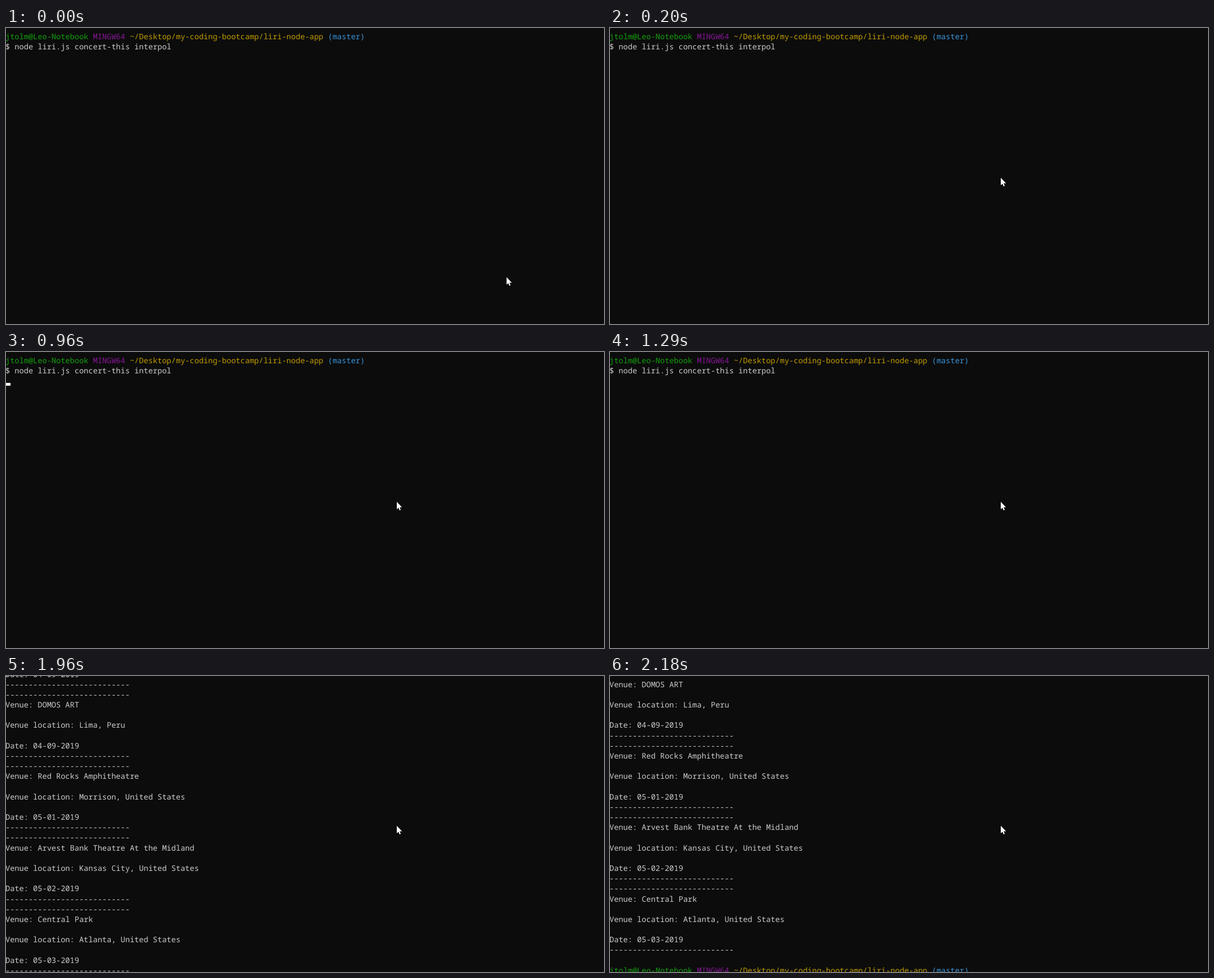
Recreate the animation shown at these times as an HTML page with a canvas. Size 1062 by 527 pixels, loop 3.06 s.

```html
<!DOCTYPE html>
<html lang="en">
<head>
<meta charset="utf-8">
<title>Terminal</title>
<style>
  html, body { margin: 0; width: 100%; height: 100%; overflow: hidden; background: #0c0c0c; }
  canvas { display: block; }
</style>
</head>
<body>
<canvas width="1062" height="527"></canvas>
<script>
const ctx = document.querySelector('canvas').getContext('2d');
const LOOP = 3060, CELL_W = 90 / 11, CELL_H = 200 / 11;
const LEFT = -1, BASE = 19.7;
const GREY = '#cccccc';

const prompt = [
  ['jtolm@Leo-Notebook ', '#13a10e'],
  ['MINGW64 ', '#881798'],
  ['~/Desktop/my-coding-bootcamp/liri-node-app ', '#c19c00'],
  ['(master)', '#3a96dd']
];
const command = '$ node liri.js concert-this interpol';
const rule = '-'.repeat(27);
const concerts = [
  ['DOMOS ART', 'Lima, Peru', '04-09-2019'],
  ['Red Rocks Amphitheatre', 'Morrison, United States', '05-01-2019'],
  ['Arvest Bank Theatre At the Midland', 'Kansas City, United States', '05-02-2019'],
  ['Central Park', 'Atlanta, United States', '05-03-2019']
];
const output = [
  'Date: 04-09-2019', rule,
  ...concerts.flatMap(([venue, place, date]) => [
    rule, 'Venue: ' + venue, '', 'Venue location: ' + place, '', 'Date: ' + date, rule
  ]),
  '', prompt
];

// A line is plain text or a list of [text, colour] runs.
function drawLine(line, row) {
  const runs = typeof line === 'string' ? [[line, GREY]] : line;
  let col = 0;
  for (const [text, color] of runs) {
    ctx.fillStyle = color;
    for (const ch of text) ctx.fillText(ch, LEFT + CELL_W * col++, BASE + CELL_H * row);
  }
}

function drawCaret(col, row) {
  const x = Math.round(col * CELL_W - 0.5);
  ctx.fillStyle = '#ffffff';
  ctx.fillRect(x, 37 + Math.round((row - 1) * CELL_H), 8 + Math.min(x, 0), 5);
}

const arrow = new Path2D('M0 0V13.4L3 10.6L5 15.2L7 14.4L5.1 9.8H9.3Z');

function drawPointer(t) {
  const step = Math.min(2, Math.floor(t / 100)) / 2;
  ctx.save();
  ctx.translate(889 - 195 * step, 443.7 - 177 * step);
  ctx.fillStyle = '#ffffff';
  ctx.fill(arrow);
  ctx.restore();
}

function draw(t) {
  ctx.fillStyle = '#0c0c0c';
  ctx.fillRect(0, 0, 1062, 527);
  ctx.font = `500 ${CELL_W / 0.6}px "Noto Sans Mono", "DejaVu Sans Mono", monospace`;
  ctx.textRendering = 'geometricPrecision';
  if (t < 1960) {
    drawLine(prompt, 0);
    drawLine(command, 1);
    if (t >= 870 && t < 960) drawCaret(command.length, 1);
    if (t >= 960 && t < 1290 || t >= 1840) drawCaret(0, 2);
  } else {
    const top = t < 2180 ? 1 : 3;
    output.forEach((line, i) => drawLine(line, i - top));
  }
  drawPointer(t);
}

const start = performance.now();
function tick() {
  draw((performance.now() - start) % LOOP);
  requestAnimationFrame(tick);
}
tick();
</script>
</body>
</html>
```
